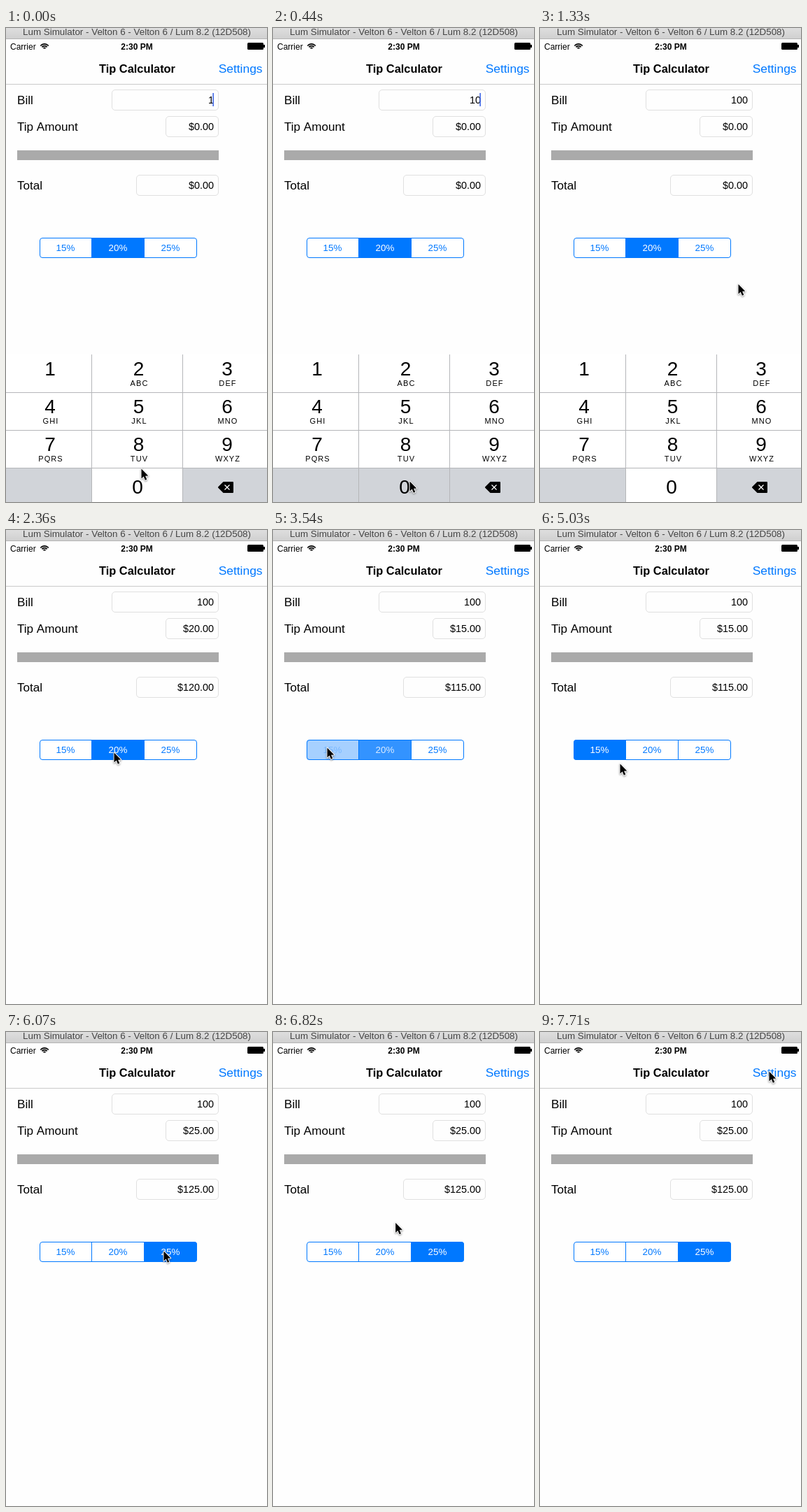
Recreate the animation shown at these times as an HTML page with a canvas. Size 373x678 px, loop 8 s.

```html
<!DOCTYPE html>
<html lang="en">
<head>
<meta charset="utf-8">
<title>Tip Calculator</title>
<style>
html, body { margin: 0; width: 100%; height: 100%; overflow: hidden; background: #fff; }
canvas { display: block; width: 373px; height: 678px; }
</style>
</head>
<body>
<canvas id="stage"></canvas>
<script>
const WIDTH = 373, HEIGHT = 678, LOOP = 8000, STEP = 148;
const BLUE = [0, 120, 255], WHITE = [255, 255, 255];
const BLUE_CSS = `rgb(${BLUE})`;
const FONT = '"Liberation Sans", Arial, sans-serif';
const RATES = [15, 20, 25];
const canvas = document.getElementById('stage');
const ctx = canvas.getContext('2d');
const ratio = window.devicePixelRatio || 1;
canvas.width = WIDTH * ratio;
canvas.height = HEIGHT * ratio;

// Places where the pointer rests; it glides between them.
const stops = [
  { arrive: 0, leave: 0, x: 193, y: 630 },    // above the zero key
  { arrive: 1, leave: 6, x: 195, y: 648 },    // zero key
  { arrive: 9, leave: 12, x: 283, y: 366 },   // empty area
  { arrive: 16, leave: 18, x: 154, y: 318 },  // 20%
  { arrive: 23, leave: 27, x: 77, y: 311 },   // 15%
  { arrive: 31, leave: 31, x: 236, y: 179 },  // amounts
  { arrive: 34, leave: 34, x: 114, y: 334 },
  { arrive: 35, leave: 35, x: 139, y: 362 },
  { arrive: 39, leave: 41, x: 225, y: 313 },  // 25%
  { arrive: 44, leave: 44, x: 137, y: 325 },
  { arrive: 51, leave: 51, x: 327, y: 60 },   // settings
  { arrive: 52, leave: 99, x: 327, y: 56 }
];

const clamp = v => Math.min(1, Math.max(0, v));
const ease = v => v * v * (3 - 2 * v);
const lerp = (a, b, v) => a + (b - a) * v;
const mix = (a, b, v) => `rgb(${a.map((c, i) => Math.round(lerp(c, b[i], v)))})`;

function pointerAt(step) {
  const i = stops.findLastIndex(s => s.arrive <= step);
  const from = stops[i], to = stops[i + 1] || from;
  const v = to === from ? 0 : ease(clamp((step - from.leave) / (to.arrive - from.leave)));
  return [lerp(from.x, to.x, v), lerp(from.y, to.y, v)];
}

function rect(x, y, w, h, color) {
  ctx.fillStyle = color;
  ctx.fillRect(x, y, w, h);
}

function text(str, x, y, size, { color = '#000', align = 'left', weight = '', spacing = 0 } = {}) {
  ctx.font = `${weight} ${size}px ${FONT}`;
  ctx.letterSpacing = spacing + 'px';
  ctx.textAlign = align;
  ctx.fillStyle = color;
  ctx.fillText(str, x, y);
}

function outline(x, y, w, h, radius, color) {
  ctx.beginPath();
  ctx.roundRect(x + .5, y + .5, w - 1, h - 1, radius);
  ctx.strokeStyle = color;
  ctx.lineWidth = 1;
  ctx.stroke();
}

function polygon(points, x, y) {
  ctx.beginPath();
  points.forEach(([px, py]) => ctx.lineTo(x + px, y + py));
  ctx.closePath();
}

function drawBars() {
  const shade = ctx.createLinearGradient(0, 0, 0, 15);
  shade.addColorStop(0, '#dedede');
  shade.addColorStop(1, '#d0d0d0');
  rect(0, 0, WIDTH, 15, shade);
  rect(0, 15, WIDTH, 1, '#b4b4b4');
  text('Lum Simulator - Velton 6 - Velton 6 / Lum 8.2 (12D508)', 187, 10, 13.4,
    { color: '#444', align: 'center' });

  text('Carrier', 6, 31, 12);
  text('2:30 PM', 187, 31, 12, { align: 'center', weight: 'bold' });
  ctx.strokeStyle = '#000';
  ctx.lineWidth = 1.7;
  for (const r of [2, 4.8, 7.6]) {
    ctx.beginPath();
    ctx.arc(55, 30.5, r, -Math.PI * .77, -Math.PI * .23);
    ctx.stroke();
  }
  ctx.fillStyle = '#000';
  ctx.beginPath();
  ctx.roundRect(345, 21, 23, 10, 1.5);
  ctx.fill();
  rect(368, 24, 2, 4, '#000');

  text('Tip Calculator', 187.5, 64, 16.4, { align: 'center', weight: 'bold' });
  text('Settings', 366.5, 64, 17.4, { color: BLUE_CSS, align: 'right' });
  rect(0, 80, WIDTH, 1, '#cacaca');
}

function drawField(label, value, x, y) {
  text(label, 16, y + 21, 17.1);
  outline(x, y, 304 - x, 30, 4.5, '#e0e0e0');
  text(value, 297, y + 20, 14.4, { align: 'right' });
}

function drawSegments(levels) {
  const left = 48, width = 75;
  ctx.save();
  ctx.beginPath();
  ctx.roundRect(left, 300, 3 * width, 29, 4);
  ctx.clip();
  levels.forEach((v, i) => {
    const x = left + i * width;
    rect(x, 300, width, 29, mix(WHITE, BLUE, v));
    if (i) rect(x - 1, 300, 1, 29, BLUE_CSS);
    text(RATES[i] + '%', x + 37, 319, 13.4,
      { color: mix(BLUE, WHITE, v ** .7), align: 'center' });
  });
  ctx.restore();
  outline(left, 300, 3 * width, 29, 3.5, BLUE_CSS);
}

function drawKeypad(offset, zeroPressed) {
  const gray = '#d1d4d9', line = '#b5b6b9', top = 467, rowHeight = 54;
  const letters = ['', 'ABC', 'DEF', 'GHI', 'JKL', 'MNO', 'PQRS', 'TUV', 'WXYZ'];
  const digit = (str, x, y) => text(str, x, y, 28, { align: 'center' });
  ctx.save();
  ctx.translate(0, offset);
  rect(0, top, WIDTH, 4 * rowHeight, '#fff');
  rect(0, 629, WIDTH, rowHeight, gray);
  rect(123, 629, 129, rowHeight, zeroPressed ? gray : '#fff');
  for (const x of [122, 252]) rect(x, top, 1, 4 * rowHeight, line);
  for (let row = 1; row < 4; row++) rect(0, top + row * rowHeight, WIDTH, 1, line);
  letters.forEach((str, i) => {
    const x = 63 + 126.5 * (i % 3), y = 496.5 + rowHeight * Math.floor(i / 3);
    digit(i + 1, x, y);
    text(str, x + 1, y + 15.5, 11, { align: 'center', spacing: 1.1 });
  });
  digit('0', 188, 666);

  polygon([[1, 8], [8, 1], [21, 1], [21, 15], [8, 15]], 303, 649);
  ctx.lineJoin = 'round';
  ctx.lineWidth = 2;
  ctx.fillStyle = ctx.strokeStyle = '#000';
  ctx.fill();
  ctx.stroke();
  ctx.strokeStyle = '#fff';
  ctx.lineWidth = 1.3;
  ctx.beginPath();
  for (const d of [-3.5, 3.5]) {
    ctx.moveTo(316 - 3.5, 657 - d);
    ctx.lineTo(316 + 3.5, 657 + d);
  }
  ctx.stroke();
  ctx.restore();
}

function drawPointer(x, y) {
  ctx.save();
  polygon([[0, 0], [0, 14], [3.2, 11], [5.4, 16.3], [7.8, 15.3], [5.6, 10.2], [9.8, 10]], x + .5, y + .5);
  ctx.lineJoin = 'round';
  ctx.lineWidth = 1.8;
  ctx.strokeStyle = '#fff';
  ctx.shadowColor = 'rgba(0,0,0,.45)';
  ctx.shadowBlur = 2.5 * ratio;
  ctx.shadowOffsetY = ratio;
  ctx.stroke();
  ctx.shadowColor = 'transparent';
  ctx.fillStyle = '#000';
  ctx.fill();
  ctx.restore();
}

// Each choice of a rate crossfades for one step.
const choices = [{ step: 0, index: 1 }, { step: 24, index: 0 }, { step: 40, index: 2 }];

function segmentLevels(step) {
  const n = choices.findLastIndex(c => c.step <= step);
  const levels = [0, 0, 0], fading = n > 0 && choices[n].step === step;
  levels[choices[n].index] = fading ? .35 : 1;
  if (fading) levels[choices[n - 1].index] = .8;
  return { levels, rate: RATES[choices[n].index] };
}

function draw(time) {
  const step = Math.floor((time + 12) / STEP);
  const bill = step < 3 ? 1 : step < 5 ? 10 : 100;
  const { levels, rate } = segmentLevels(step);
  const entered = step >= 11;
  const money = v => '$' + (entered ? v : 0).toFixed(2);
  const slide = clamp((step - 10.4) / 2.6);

  ctx.setTransform(ratio, 0, 0, ratio, 0, 0);
  rect(0, 0, WIDTH, HEIGHT, '#fefefe');
  drawBars();
  drawField('Bill', bill, 151, 88);
  drawField('Tip Amount', money(bill * rate / 100), 228, 126);
  rect(16, 175, 288, 14, '#aaa');
  drawField('Total', money(bill * (1 + rate / 100)), 186, 210);
  if (step === 0 || (step >= 3 && step < 8)) rect(295.3, 93, 1.7, 19, '#4a70e8');
  drawSegments(levels);
  if (slide < 1) drawKeypad(216 * ease(slide), step === 3 || step === 4);
  drawPointer(...pointerAt(step));
}

const start = performance.now();
function tick() {
  draw((performance.now() - start) % LOOP);
  requestAnimationFrame(tick);
}
tick();
</script>
</body>
</html>
```
